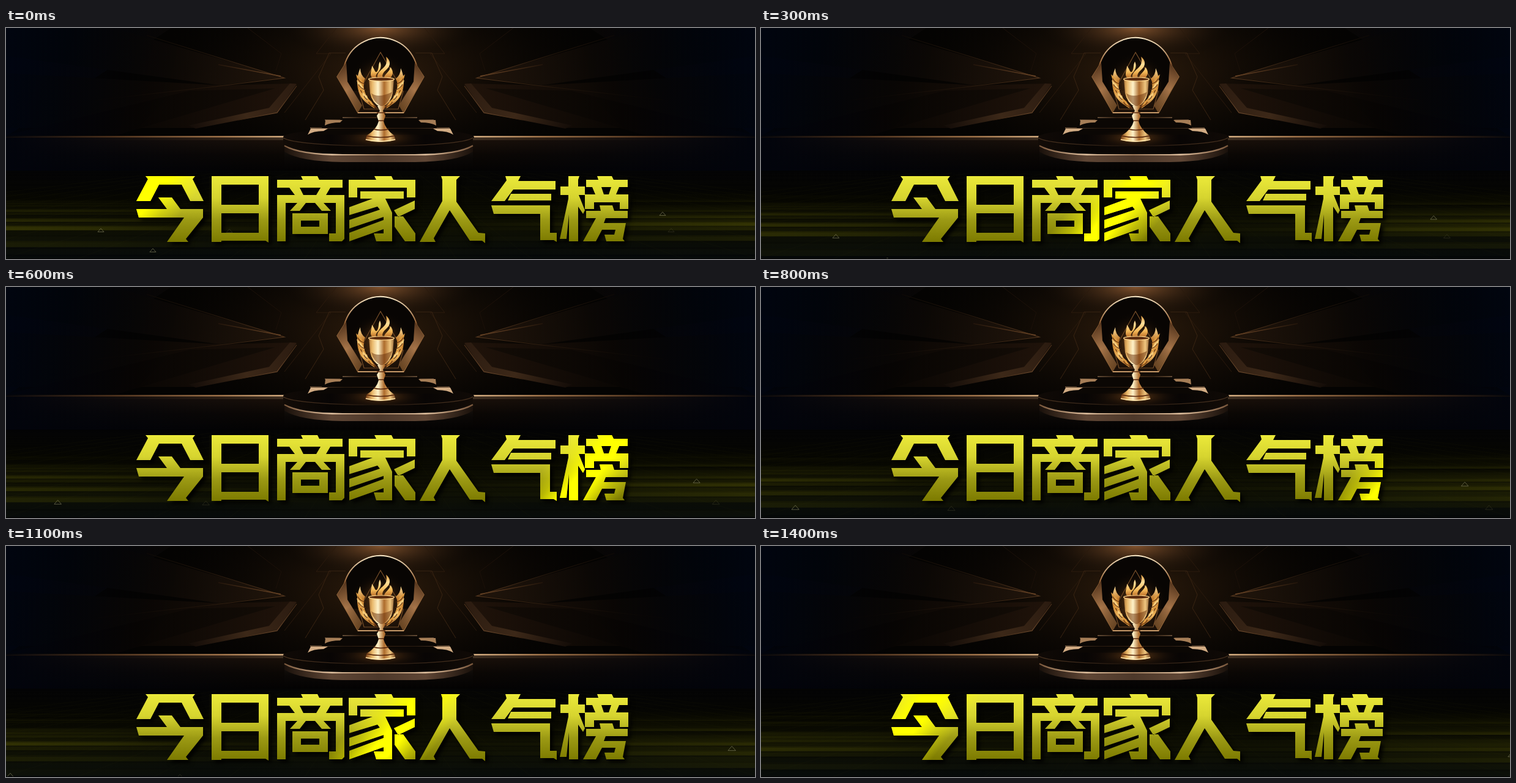
An HTML page with a canvas for the animation above (1.5 s loop, 1224 px wide and 379 px high).

```html
<!DOCTYPE html>
<html lang="zh">
<head>
<meta charset="utf-8">
<title>今日商家人气榜</title>
<style>
html, body { margin: 0; width: 100%; height: 100%; overflow: hidden; background: #000; }
canvas { display: block; }
</style>
</head>
<body>
<canvas id="stage" width="1224" height="379" role="img" aria-label="今日商家人气榜"></canvas>
<script>
const W = 1224, H = 379, CX = 612, HORIZON = 193;
const STEP = 100, STEPS = 15;
const ctx = document.getElementById('stage').getContext('2d');

function layer(paint) {
  const c = document.createElement('canvas');
  c.width = W;
  c.height = H;
  paint(c.getContext('2d'));
  return c;
}

function fade(g, x0, y0, x1, y1, ...stops) {
  const f = g.createLinearGradient(x0, y0, x1, y1);
  stops.forEach((s, i) => f.addColorStop(i / (stops.length - 1), s));
  return f;
}

function glow(g, x, y, r, color, sx = 1, sy = 1) {
  g.save();
  g.translate(x, y);
  g.scale(sx, sy);
  const f = g.createRadialGradient(0, 0, 0, 0, 0, r);
  f.addColorStop(0, color);
  f.addColorStop(1, 'rgba(0,0,0,0)');
  g.fillStyle = f;
  g.fillRect(-r, -r, 2 * r, 2 * r);
  g.restore();
}

function fill(g, d, style) {
  g.fillStyle = style;
  g.fill(new Path2D(d));
}

function line(g, d, style, width = 1) {
  g.strokeStyle = style;
  g.lineWidth = width;
  g.stroke(new Path2D(d));
}

// Draws once as is and once reflected about the stage centre.
function mirrored(g, paint) {
  paint();
  g.save();
  g.translate(2 * CX, 0);
  g.scale(-1, 1);
  paint();
  g.restore();
}

function paintHall(g) {
  g.fillStyle = '#040302';
  g.fillRect(0, 0, W, H);
  glow(g, CX, 70, 200, 'rgba(62,38,16,.75)', 2, 0.95);
  glow(g, CX, 0, 130, 'rgba(165,105,58,.75)', 1.3, 0.4);
  mirrored(g, () => {
    fill(g, 'M0 0H270L0 178Z', fade(g, 0, 0, 300, 0, '#020510', '#0a0704'));
    fill(g, 'M175 0L455 81L350 94L0 46V0Z', fade(g, 100, 0, 455, 60, '#030509', '#0c0805', '#21150b'));
    fill(g, 'M0 74L350 94L474 91L441 138L310 164H0Z', fade(g, 0, 0, 474, 0, '#03050a', '#0b0704', '#20130a'));
    fill(g, 'M0 176L300 103L440 99L180 176Z', fade(g, 0, 0, 440, 0, '#03040a', '#080503', '#130c06'));
    line(g, 'M230 12L455 82L350 95L150 118', fade(g, 190, 0, 455, 0, '#0c0805', '#20140a', '#58391f'), 1.1);
    line(g, 'M347 60L449 79', fade(g, 347, 0, 449, 0, '#24160b', '#6a4526'), 1.3);
    line(g, 'M395 0L450 42L441 70', '#1c1109');
    fill(g, 'M475 92L443 139L310 165L298 160L430 131L464 91Z',
      fade(g, 298, 165, 475, 92, '#120b07', '#3c2818', '#2b1b10'));
    line(g, 'M475 95L443 139L380 151', fade(g, 380, 151, 475, 92, '#33200f', '#6d4a2d', '#4c301a'), 1.2);
    line(g, 'M540 0L507 42L531 42L455 139', '#2b1a0d');
    line(g, 'M555 41H528L511 80L519 102L489 151', '#392412');
  });
  fill(g, 'M0 0H380L0 379Z', fade(g, 0, 0, 290, 60, 'rgba(0,5,17,.8)', 'rgba(0,0,0,0)'));
  fill(g, 'M1224 0H844L1224 379Z', fade(g, 1224, 0, 934, 60, 'rgba(0,5,17,.8)', 'rgba(0,0,0,0)'));
}

function paintArch(g) {
  fill(g, 'M567 39L541 80L575 139H650L683 80L656 39Z', '#1b1008');
  line(g, 'M567 39L541 80L575 139H650L683 80L656 39', '#9b6b3d', 1.4);
  g.beginPath();
  g.arc(CX, 77, 61, 2.7, 6.72);
  g.fillStyle = '#080503';
  g.fill();
  g.strokeStyle = fade(g, 0, 14, 0, 103, '#fff0cf', '#9b6537', '#3a2210');
  g.lineWidth = 2;
  g.stroke();
  mirrored(g, () => fill(g, 'M541 80L556 56L558 88L582 127L575 139Z',
    fade(g, 541, 60, 580, 139, '#4a2d17', '#a8764a', '#65421f')));
  glow(g, CX, 94, 57, 'rgba(130,77,30,.65)');
  line(g, 'M612 40L577 104L585 133H641L649 104Z', '#79502a', 1.2);
  line(g, 'M575 139H650', '#e2b27c', 1.7);
}

function paintPodium(g) {
  g.fillStyle = fade(g, 0, 178, 0, 238, '#24160c', '#0d0804', '#030202');
  g.fillRect(0, 178, W, 60);
  const edge = fade(g, 0, 0, W, 0, '#05060b', '#4a301c', '#9b7048', '#f0cda0', '#f0cda0', '#9b7048', '#4a301c', '#05060b');
  g.fillStyle = edge;
  g.fillRect(0, 177, W, 2.5);
  g.globalAlpha = 0.25;
  g.fillRect(0, 179, W, 5);
  g.globalAlpha = 1;
  g.fillStyle = fade(g, 0, 0, W, 0, '#02040c', 'rgba(2,4,10,.4)', 'rgba(0,0,0,0)', 'rgba(2,4,10,.4)', '#02040c');
  g.fillRect(0, 180, W, 64);

  fill(g, 'M455 190H763V235H455Z', fade(g, 0, 190, 0, 235, '#1b1410', '#0b0806', '#030202'));
  const rim = 'Q480 208 550 208H668Q738 208 763 193';
  fill(g, `M455 193${rim}V203Q738 219 668 220H550Q480 219 455 203Z`,
    fade(g, 455, 0, 763, 0, '#1a110b', '#5f4635', '#4d382a', '#5f4635', '#1a110b'));
  line(g, `M455 193${rim}`, fade(g, 455, 0, 763, 0, '#7a573b', '#e4c4a2', '#9c795a', '#e4c4a2', '#7a573b'), 2.2);
  fill(g, 'M453 178H763V191Q738 205 668 205H550Q480 205 453 191Z',
    fade(g, 453, 0, 763, 0, '#130c07', '#080503', '#0d0805', '#080503', '#130c07'));
  g.beginPath();
  g.ellipse(609, 179, 156, 15, 0, 0, 2 * Math.PI);
  g.fillStyle = fade(g, 453, 0, 763, 0, '#100a06', '#080504', '#211309', '#080504', '#100a06');
  g.fill();
  line(g, 'M453 180C475 198 741 198 763 180', fade(g, 453, 0, 763, 0, '#4a3320', '#3a281a', '#1a110a', '#3a281a', '#4a3320'), 1.2);
  const steps = [[497, 725, 164, 175], [521, 699, 151, 164], [550, 672, 147, 152]];
  for (const [l, r, t, b] of steps) {
    fill(g, `M${l} ${t}H${r}L${r + 5} ${b}H${l - 5}Z`, '#0b0704');
    line(g, `M${l} ${t}H${r}`, fade(g, l, 0, r, 0, '#b58d66', '#4b301b', '#6b4525', '#4b301b', '#b58d66'), 1.2);
  }
  mirrored(g, () => {
    fill(g, 'M498 165H526L519 169Q502 169 493 175Z', '#d2ac84');
    fill(g, 'M522 151H550L546 155Q530 155 521 160Z', '#a67e57');
  });
  glow(g, CX, 180, 70, 'rgba(210,126,45,.4)', 1, 0.22);
}

function paintTrophy(g) {
  const gold = fade(g, 588, 0, 638, 0, '#713a13', '#e8b566', '#fff2c9', '#ad6b2c', '#f0c780', '#62300f');
  glow(g, 612, 92, 48, 'rgba(215,125,40,.3)');
  mirrored(g, () => {
    fill(g, 'M579 66C568 90 574 123 607 132L600 124C584 112 582 91 587 83Q579 77 579 66Z',
      fade(g, 573, 66, 605, 131, '#ffe3a0', '#c17a2b', '#f0b65c', '#7a3d12'));
    // Feather tips along the outer curve, divided by dark grooves.
    for (let i = 0; i < 5; i++) {
      const x = 575 + i * i * 1.1, y = 83 + i * 9.5;
      fill(g, `M${x - 3} ${y - 7}Q${x - 1} ${y + 6} ${x + 10} ${y + 11}L${x + 5} ${y}Z`, i % 2 ? '#f7cd7c' : '#dc9a41');
      line(g, `M${x} ${y}Q${x + 3} ${y + 7} ${x + 12} ${y + 9}`, '#5a2b0d', 1.1);
    }
  });
  const flame = fade(g, 0, 47, 0, 85, '#d69239', '#ffe09a', '#f4b958', '#a8571c');
  fill(g, 'M610 84C603 79 609 72 616 66C622 61 623 55 621 47C629 53 629 62 622 68C616 73 613 78 617 84Z', flame);
  fill(g, 'M601 84C592 78 598 70 598 62C603 68 602 73 606 72C610 67 608 60 611 55C615 63 611 70 606 75C603 79 605 82 607 84Z', flame);
  fill(g, 'M619 84C615 77 628 72 628 64C634 71 633 78 626 84Z', flame);
  fill(g, 'M593 83H634L632 107Q629 123 615 130H612Q598 123 595 107Z', gold);
  g.beginPath();
  g.ellipse(613.5, 84, 21, 3, 0, 0, 2 * Math.PI);
  g.fillStyle = '#5b2b0e';
  g.fill();
  g.strokeStyle = '#ffd68b';
  g.lineWidth = 1.2;
  g.stroke();
  fill(g, 'M597 107Q608 116 631 105Q627 122 614 129Q600 122 597 107Z', 'rgba(106,51,13,.5)');
  fill(g, 'M607 128H620L616 136L620 144L617 153Q620 166 634 176L637 184Q612 190 587 184L590 176Q606 166 609 153L606 144L611 136Z', gold);
  line(g, 'M606 139H620M608 152H618M601 166Q612 169 625 166M589 177Q612 182 635 177', '#5a290c', 1.3);
  line(g, 'M588 183Q612 189 636 183', '#ffe6ac', 1.5);
}

const scene = layer(g => {
  paintHall(g);
  paintArch(g);
  paintPodium(g);
  paintTrophy(g);
});

const glyphs = [
  // 今
  'M228 243H309L305 248L323 284H301L287 257H250L236 284H213L232 248Z M249 278H271L285 297H322V311L294 346L298 351H263L291 311H217L213 297H263Z',
  // 日
  'M336 243H429V352L424 349H352V351H336Z M352 257V290H413V257Z M352 304V336H413V304Z',
  // 商
  'M482 243H509L512 249H550V262H530L523 274H553V346L549 350H528V337H539V287H457V350H443V274H472L463 262H443V249H485Z M480 262L486 274H507L514 262Z M476 287H490L480 300H464Z M505 287H519L531 300H516Z M468 304H526V338H468Z M482 316V326H512V316Z',
  // 家
  'M602 243H630L633 249H669V278H655V262H574V278H560V249H605Z M579 268H650V280H620L631 303V350H605L601 337H617V330L561 350V336L617 315V310L561 329V315L611 298L607 293L561 307V294L599 280H579Z M668 283V297L641 310L634 299Z M635 309H649L669 337V350H652L635 326Z',
  // 人
  'M711 243H742L736 249V285L772 336L783 337V353L778 349H758L725 299L699 345L702 351H676L713 284V249Z',
  // 气
  'M816 243H841L837 251H898V265H829L815 284H793L818 250Z M825 272H891V283H820Z M793 291H889V336H900V351L895 348H873V305H797Z',
  // 榜
  'M919 243H937L935 249V260H946V274H936L946 299L943 305L935 293V350H920V306L916 346H905L919 280V274H906V260H919V249Z M966 243H990L993 249H1016V261H1002L997 273H1017V297H1003V286H961V297H946V273H963L958 261H948V249H968Z M973 261L977 273H985L989 261Z M970 291H991L994 300H1016V312H980L977 320H1013L1008 346L1011 350H981L978 339H994L996 331H974L964 350H943L964 312H948V300H972Z'
].map(d => new Path2D(d));

const title = layer(g => {
  g.fillStyle = fade(g, 0, 243, 0, 351, '#ebe93a', '#d6d42f', '#9c9a14', '#7c7a00');
  g.shadowColor = 'rgba(0,0,0,.9)';
  g.shadowBlur = 6;
  g.shadowOffsetX = g.shadowOffsetY = 5;
  glyphs.forEach(p => g.fill(p, 'evenodd'));
});

function noise(a, b) {
  const n = Math.sin(a * 127.1 + b * 311.7) * 43758.545;
  return n - Math.floor(n);
}

// The floor approaches at constant speed: inverse depth falls evenly.
const SPEED = 0.00016;
const rowY = w => HORIZON + 1 / w;

function paintFloor(step) {
  const travel = step * SPEED;
  ctx.save();
  ctx.beginPath();
  ctx.rect(0, 234, W, 144);
  ctx.clip();
  ctx.fillStyle = fade(ctx, 0, 234, 0, 379, '#040405', '#060601', '#0c0d03', '#060a0a');
  ctx.fillRect(0, 234, W, 145);

  const depth = 0.0004;
  const olive = a => `rgba(66,66,4,${a})`;
  for (let row = Math.floor((0.0053 + travel) / depth); row < (0.025 + travel) / depth; row++) {
    const near = Math.max(row * depth - travel, 0.005), far = (row + 1) * depth - travel;
    const top = rowY(far), height = rowY(near) - top;
    const lift = Math.max(0, 1 - Math.abs(top + height / 2 - 324) / 55);
    const left = noise(row, 1) * lift, right = noise(row, 2) * lift;
    ctx.fillStyle = fade(ctx, 0, 0, W, 0, olive(left * 0.8), olive(left * 0.6), olive(left * 0.2),
      olive(0.05), olive(0.05), olive(right * 0.2), olive(right * 0.6), olive(right * 0.8));
    ctx.fillRect(0, top, W, height);
    ctx.fillStyle = `rgba(0,1,4,${noise(row, 3) * 0.3})`;
    ctx.fillRect(0, top, W, 1 + height * 0.15);
  }
  for (let i = -12; i <= 12; i++) {
    line(ctx, `M${CX + i * 30} 238L${CX + i * 124} 379`, 'rgba(65,66,24,.08)');
  }

  // Small floor markers: offset from the vanishing point at loop start.
  const marks = [[-457, 139, 1], [-372, 172, 1], [461, 112, 1], [-247, 140, 0], [475, 139, 0]];
  for (const [mx, my, bright] of marks) {
    const scale = 1 / (1 - travel * my);
    const x = CX + mx * scale, y = HORIZON + my * scale, r = 5 * scale;
    line(ctx, `M${x - r} ${y + r * 0.5}L${x} ${y - r * 0.65}L${x + r} ${y + r * 0.5}Z`,
      bright ? 'rgba(128,126,93,.65)' : 'rgba(80,79,52,.35)');
  }
  ctx.restore();
  ctx.fillStyle = '#000';
  ctx.fillRect(0, 378, W, 1);
}

function paintShine(step) {
  const x = step < 8 ? 210 + 125 * step : 1050 - 135 * (step - 8);
  ctx.fillStyle = fade(ctx, x - 50, 257, x + 50, 337,
    'rgba(255,255,0,0)', 'rgba(255,255,0,.4)', '#ff0', '#ff0', 'rgba(255,255,0,.4)', 'rgba(255,255,0,0)');
  glyphs.forEach(p => ctx.fill(p, 'evenodd'));
}

function frame(now) {
  const step = Math.floor(now / STEP) % STEPS;
  ctx.drawImage(scene, 0, 0);
  paintFloor(step);
  ctx.drawImage(title, 0, 0);
  paintShine(step);
  requestAnimationFrame(frame);
}
frame(performance.now());
</script>
</body>
</html>
```
